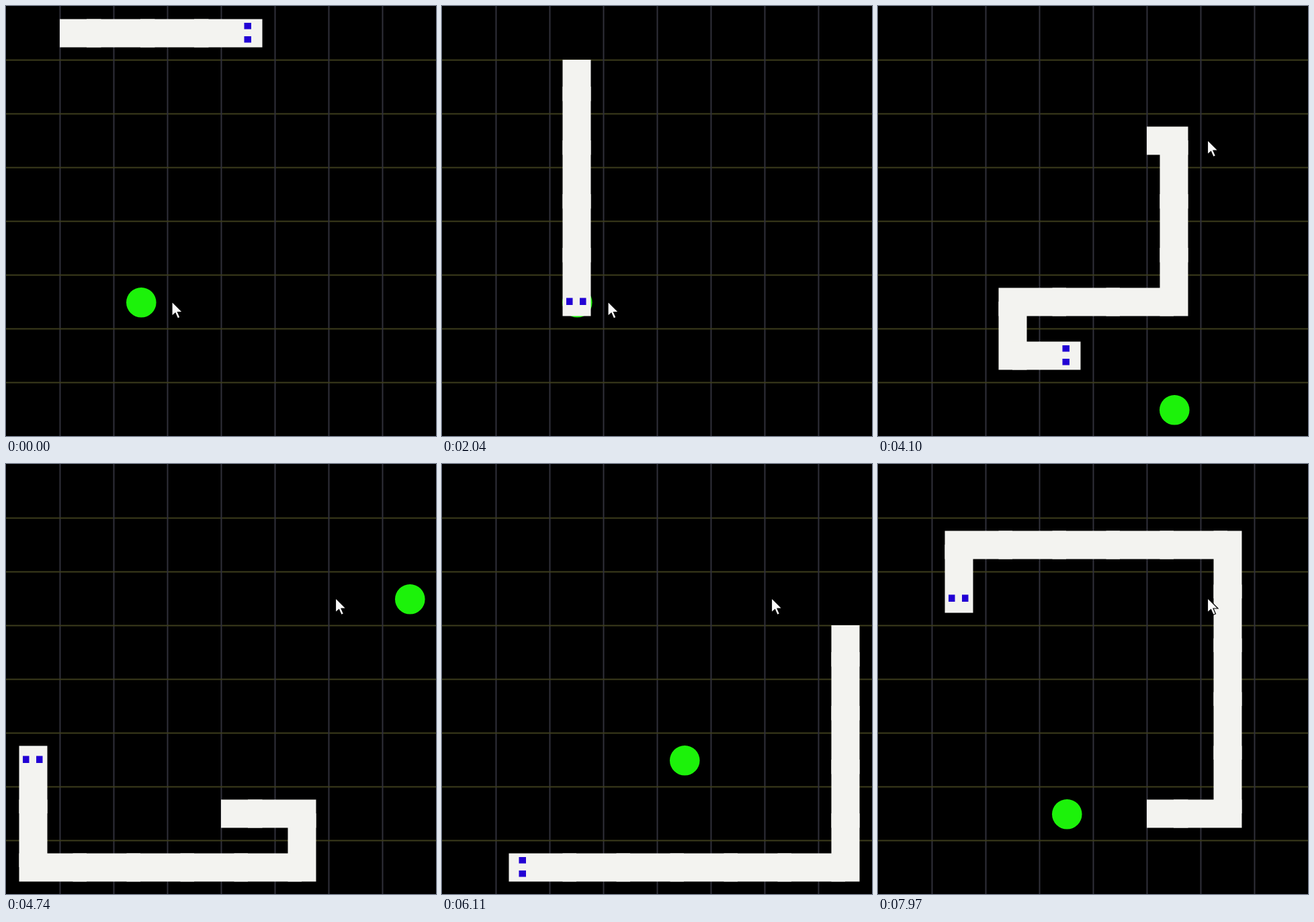
Animation, 640 px wide and 640 px high, one loop 8 s. Source, as an HTML page with a canvas:

```html
<!DOCTYPE html>
<html lang="en">
<head>
<meta charset="utf-8">
<title>Snake</title>
<style>
  html, body { margin: 0; width: 100%; height: 100%; overflow: hidden; background: #000; }
  canvas { display: block; width: 100vw; height: 100vh; }
</style>
</head>
<body>
<canvas id="stage" width="640" height="640"></canvas>
<script>
const ctx = document.getElementById('stage').getContext('2d');
const SIZE = 640, CELL = 80, LOOP = 8000;
const COLORS = {
  column: '#30303a', row: '#3c3c1c', snake: '#f3f3f0', eye: '#2200d4', food: '#1cf20a', cursor: '#fafafa'
};

// Corners of the snake's route, written as column and row.
const CORNERS = ('00 70 77 07 00 20 25 26 06 03 13 16 46 45 25 22 52 55 25 26 36 56 57 07 ' +
  '02 72 77 07 02 52 55 45 46 66 61 11 12').split(' ').map(toCell);
const START = 4, START_LENGTH = 4;

// Food cells and the move on which each is eaten.
const FOODS = [['25', 31], ['03', 37], ['36', 43], ['35', 46], ['52', 53],
  ['57', 64], ['72', 81], ['45', 107], ['11', 120], ['36', Infinity]];

// Time in ms against moves made.
const PACE = [[0, 0.5], [1170, 18.4], [2900, 44.3], [4100, 61.8], [5370, 81.2], [6870, 104.5], [8000, 121.8]];
// Time in ms against pointer position.
const POINTER = [[0, 247, 440], [2150, 247, 440], [2420, 535, 205], [2650, 490.5, 199.5], [LOOP, 490.5, 199.5]];

const route = buildRoute(CORNERS);

function toCell(text) {
  return { x: +text[0], y: +text[1] };
}

function buildRoute(corners) {
  const cells = [corners[0]];
  for (const corner of corners.slice(1)) {
    let { x, y } = cells[cells.length - 1];
    while (x !== corner.x || y !== corner.y) {
      x += Math.sign(corner.x - x);
      y += Math.sign(corner.y - y);
      cells.push({ x, y });
    }
  }
  return cells;
}

function sample(keys, time, ease = p => p) {
  const i = Math.max(1, keys.findIndex(key => key[0] >= time));
  const from = keys[i - 1], to = keys[i];
  const p = ease((time - from[0]) / (to[0] - from[0]));
  return from.slice(1).map((v, k) => v + (to[k + 1] - v) * p);
}

const smooth = p => p * p * (3 - 2 * p);
const center = v => (v + 0.5) * CELL;

function drawGrid() {
  ctx.fillStyle = '#000';
  ctx.fillRect(0, 0, SIZE, SIZE);
  for (let p = CELL; p < SIZE; p += CELL) {
    ctx.fillStyle = COLORS.column;
    ctx.fillRect(p - 0.5, 0, 2, SIZE);
    ctx.fillStyle = COLORS.row;
    ctx.fillRect(0, p - 0.5, SIZE, 2);
  }
}

function drawFood(cell) {
  ctx.fillStyle = COLORS.food;
  ctx.beginPath();
  ctx.arc(center(cell.x) + 1.3, center(cell.y) + 1.3, 22.3, 0, Math.PI * 2);
  ctx.fill();
}

// A block on the cell, stretched back towards the cell before it.
function drawLink(cell, before, reach) {
  const x = center(cell.x), y = center(cell.y);
  const dx = (before.x - cell.x) * reach, dy = (before.y - cell.y) * reach;
  const left = Math.min(x - 20.5, x + dx), top = Math.min(y - 20.5, y + dy);
  ctx.fillRect(left, top, Math.max(x + 21.5, x + dx) - left, Math.max(y + 21.5, y + dy) - top);
}

function drawSnake(head, length) {
  ctx.fillStyle = COLORS.snake;
  const tail = head - length + 1;
  for (let i = tail; i <= head; i++) {
    drawLink(route[i], route[i - 1], i === tail ? CELL / 2 : CELL);
  }
  const { x, y } = route[head];
  const sideways = route[head - 1].y === y;
  ctx.fillStyle = COLORS.eye;
  for (const side of [-15, 5]) {
    if (sideways) ctx.fillRect(center(x) - 5.5, center(y) + side, 10.5, 9.5);
    else ctx.fillRect(center(x) + side, center(y) - 5.5, 9.5, 10.5);
  }
}

const arrow = new Path2D('M0 0V21.5L5 17L8.5 25L12 23.5L8.5 15.5H15.5Z');

function drawPointer([x, y]) {
  ctx.save();
  ctx.translate(x, y);
  ctx.fillStyle = COLORS.cursor;
  ctx.strokeStyle = '#000';
  ctx.lineWidth = 1.2;
  ctx.fill(arrow);
  ctx.stroke(arrow);
  ctx.restore();
}

function draw(time) {
  const move = Math.floor(sample(PACE, time)[0]);
  const eaten = FOODS.filter(food => food[1] <= move).length;
  const food = FOODS.find(item => item[1] >= move);
  drawGrid();
  drawFood(toCell(food[0]));
  drawSnake(START + move, START_LENGTH + eaten);
  drawPointer(sample(POINTER, time, smooth));
}

const begin = performance.now();

function tick() {
  draw((performance.now() - begin) % LOOP);
  requestAnimationFrame(tick);
}
tick();
</script>
</body>
</html>
```
